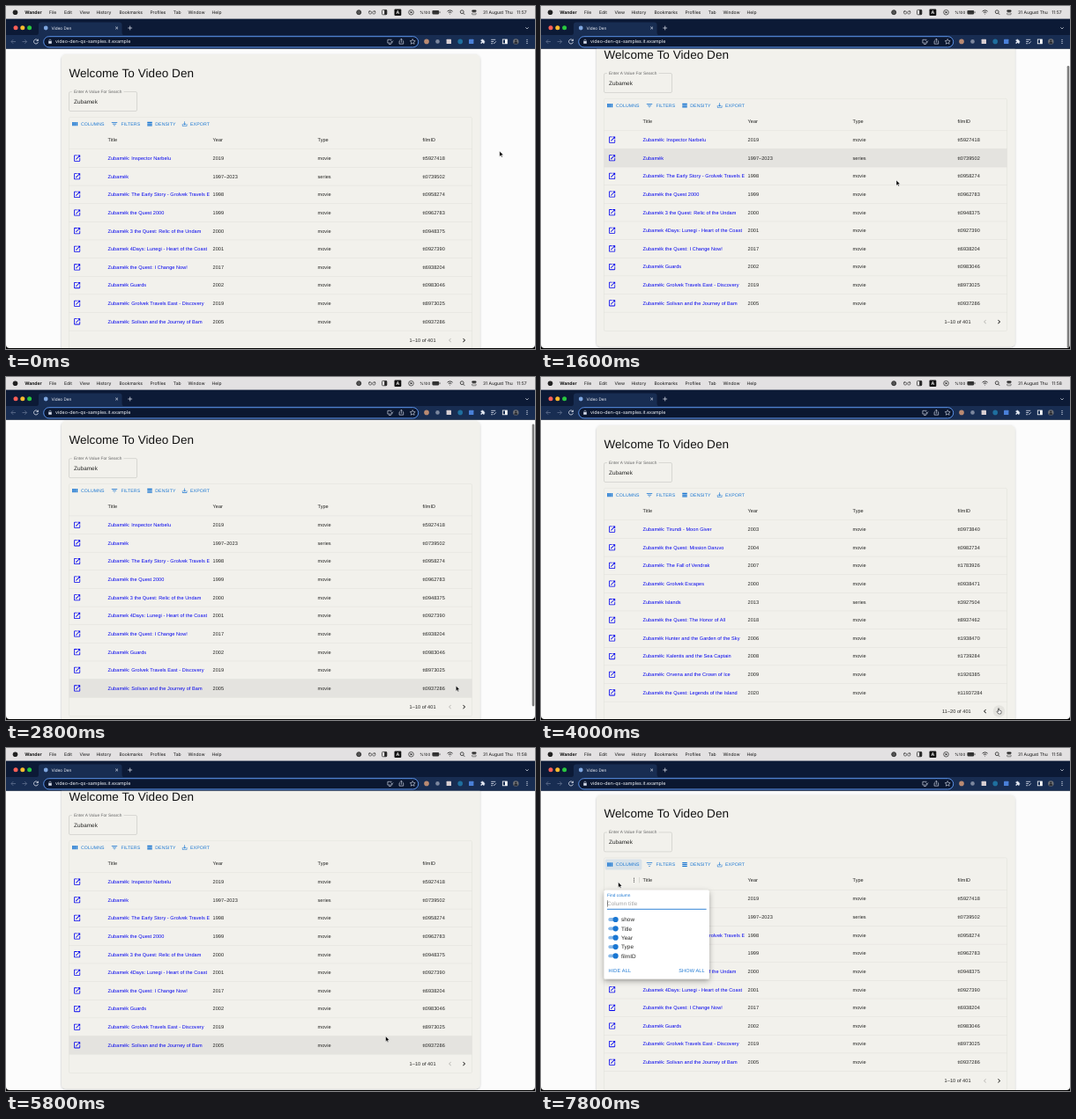
Animation, 600 px wide and 390 px high, one loop 8 s. Source, as an HTML page:

```html
<!DOCTYPE html>
<html lang="en">
<head>
<meta charset="utf-8">
<title>Video Den</title>
<style>
  html, body { margin: 0; width: 100%; height: 100%; overflow: hidden; background: #000; }
  svg { display: block; width: 100vw; height: 100vh; text-rendering: geometricPrecision; }
  text { font-family: "Liberation Sans", Arial, sans-serif; letter-spacing: .0107em; white-space: pre; }
  .ui { font-family: Inter, sans-serif; letter-spacing: 0; }
</style>
</head>
<body>
<svg id="stage" viewBox="0 0 600 390">
  <defs>
    <clipPath id="view"><path d="M0 48.5H600V385a4 4 0 0 1-4 4H4a4 4 0 0 1-4-4z"/></clipPath>
    <clipPath id="titleCol"><rect x="111" y="140" width="119.7" height="240"/></clipPath>
    <filter id="soft" x="-10%" y="-10%" width="120%" height="125%">
      <feDropShadow dx="0" dy=".8" stdDeviation="1" flood-opacity=".28"/>
    </filter>
    <filter id="deep" x="-20%" y="-20%" width="140%" height="150%">
      <feDropShadow dx="0" dy="2.5" stdDeviation="3" flood-opacity=".34"/>
    </filter>
  </defs>
</svg>
<script>
const LOOP = 8000, STEP = 200;
const ROW_TOP = 162.8, ROW_H = 20.635, MAX_SCROLL = 21;
const BLUE = '#1976d2', LINK = '#0000ee', INK = '#222220', LINE = '#dfded9';
const stage = document.getElementById('stage');

function add(parent, tag, attrs = {}, content) {
  const node = document.createElementNS(stage.namespaceURI, tag);
  for (const key in attrs) node.setAttribute(key, attrs[key]);
  if (content !== undefined) node.textContent = content;
  return parent.appendChild(node);
}
const group = (parent, attrs) => add(parent, 'g', attrs);
const rect = (parent, x, y, width, height, fill, more) =>
  add(parent, 'rect', { x, y, width, height, fill, ...more });
const circle = (parent, cx, cy, r, fill, more) => add(parent, 'circle', { cx, cy, r, fill, ...more });
const stroke = (parent, d, color, width = .8, more) =>
  add(parent, 'path', { d, fill: 'none', stroke: color, 'stroke-width': width, ...more });
const label = (parent, x, y, size, fill, content, more) =>
  add(parent, 'text', { x, y, 'font-size': size, fill, ...more }, content);
// Icon drawn on a 24-unit grid, centred on x, y
const icon = (parent, d, x, y, size, fill) => add(parent, 'path', {
  d, fill, transform: `translate(${x - size / 2} ${y - size / 2}) scale(${size / 24})`
});

const ICONS = {
  open: 'M19 19H5V5h7V3H5c-1.1 0-2 .9-2 2v14c0 1.1.9 2 2 2h14c1.1 0 2-.9 2-2v-7h-2zM14 3v2h3.6l-9.8 9.8 1.4 1.4L19 6.4V10h2V3z',
  columns: 'M2 5h5.4v14H2zM9.3 5h5.4v14H9.3zM16.6 5H22v14h-5.4z',
  filters: 'M10 18h4v-2h-4zM3 6v2h18V6zm3 7h12v-2H6z',
  density: 'M21 8H3V4h18zM21 10H3v4h18zM21 16H3v4h18z',
  download: 'M19 12v7H5v-7H3v7c0 1.1.9 2 2 2h14c1.1 0 2-.9 2-2v-7zm-6 .7 2.6-2.6L17 11.5l-5 5-5-5 1.4-1.4 2.6 2.6V3h2z',
  left: 'M15.4 7.4 14 6l-6 6 6 6 1.4-1.4-4.6-4.6z',
  right: 'M10 6 8.6 7.4l4.6 4.6-4.6 4.6L10 18l6-6z',
  puzzle: 'M20 11h-1V7a2 2 0 0 0-2-2h-4V3.500a2.500 2.500 0 0 0-5 0V5H4v5h1.500a2.700 2.700 0 0 1 0 5.400H4V21h5v-1.500a2.700 2.700 0 0 1 5.400 0V21H19v-5h1a2.500 2.500 0 0 0 0-5z'
};

const NAME = 'Zubamék';
const PAGES = [
  { range: '1–10 of 401', x: 457.6, rows: [
    [': Inspector Narbelu', '2019', 'tt5927418'],
    ['', '1997–2023', 'tt0739502', 'series'],
    [': The Early Story - Grolvek Travels East', '1998', 'tt0958274'],
    [' the Quest 2000', '1999', 'tt0962783'],
    [' 3 the Quest: Relic of the Undam', '2000', 'tt0948375'],
    [' 4Days: Lunegi - Heart of the Coast', '2001', 'tt0927390'],
    [' the Quest: I Change Now!', '2017', 'tt6938204'],
    [' Guards', '2002', 'tt0983046'],
    [': Grolvek Travels East - Discovery', '2019', 'tt8973025'],
    [': Solivan and the Journey of Bam', '2005', 'tt0937286']
  ] },
  { range: '11–20 of 401', x: 455, rows: [
    [': Tirundi - Moon Giver', '2003', 'tt0973840'],
    [' the Quest: Mission Daruvo', '2004', 'tt0982734'],
    [': The Fall of Vendrak', '2007', 'tt1783926'],
    [': Grolvek Escapes', '2000', 'tt0938471'],
    [' Islands', '2013', 'tt3927504', 'series'],
    [' the Quest: The Honor of All', '2018', 'tt8937462'],
    [' Hunter and the Garden of the Sky', '2006', 'tt1938470'],
    [': Kalentis and the Sea Captain', '2008', 'tt1739284'],
    [': Orvena and the Crown of Ice', '2009', 'tt1926385'],
    [' the Quest: Legends of the Island', '2020', 'tt11937284']
  ] }
];

// Page
const view = group(stage, { 'clip-path': 'url(#view)' });
rect(view, 0, 48, 600, 342, '#fcfcfc');
const page = group(view);
rect(page, 63, 55, 474.5, 353.5, '#f2f1ec', { rx: 5, filter: 'url(#soft)' });
label(page, 71.4, 80.8, 13.5, '#111', 'Welcome To Video Den', { style: 'letter-spacing:.005em' });
stroke(page, 'M75 97.600H73a1.500 1.500 0 0 0-1.500 1.500V118a1.500 1.500 0 0 0 1.500 1.500H147a1.500 1.500 0 0 0 1.500-1.500V99a1.500 1.500 0 0 0-1.500-1.500H133.500', '#bdbcb8', .5);
label(page, 77, 99.1, 4.76, '#666', 'Enter A Value For Search');
label(page, 77, 110.8, 6.35, INK, 'Zubamek');

const hoverRow = rect(page, 71.5, ROW_TOP, 457, ROW_H, '#e4e3df');
rect(page, 71.5, 126.4, 457, 264.2, 'none', { rx: 1.6, stroke: LINE, 'stroke-width': .5 });
const columnsHover = rect(page, 72.800, 128, 41.500, 12.200, BLUE, { rx: 1.6, opacity: .12 });
[['columns', 78.2, 84.9, 'COLUMNS'], ['filters', 123, 130.4, 'FILTERS'],
 ['density', 163, 169.2, 'DENSITY'], ['download', 202.6, 209, 'EXPORT']].forEach(([name, ix, tx, word]) => {
  icon(page, ICONS[name], ix, 134.1, name === 'filters' ? 8.6 : 7.3, BLUE);
  label(page, tx, 136, 5.16, BLUE, word, { style: 'letter-spacing:.0286em' });
});
[[115.5, 'Title'], [234.5, 'Year'], [353.5, 'Type'], [472.6, 'filmID']]
  .forEach(([x, word]) => label(page, x, 153.7, 5.56, INK, word));
for (let i = 0; i <= 10; i++) rect(page, 71.5, ROW_TOP - .25 + i * ROW_H, 457, .5, LINE);

const pageGroups = PAGES.map(({ range, x, rows }, n) => {
  const g = group(page);
  const titles = group(g, { 'clip-path': 'url(#titleCol)' });
  rows.forEach(([title, year, id, type = 'movie'], i) => {
    const mid = ROW_TOP + (i + .5) * ROW_H, base = mid + 1.85;
    const brand = title.startsWith(' 4') ? 'Zubamek' : NAME;
    icon(g, ICONS.open, 80.6, mid, 9.5, LINK);
    label(titles, 115.5, base, 5.56, LINK, brand + title);
    label(g, 234.5, base, 5.56, INK, year);
    label(g, 353.5, base, 5.56, INK, type);
    label(g, 472.6, base, 5.56, INK, id);
  });
  label(g, x, 382, 5.56, INK, range);
  icon(g, ICONS.left, 503.6, 380, 9.5, n ? INK : '#bcbbb7');
  icon(g, ICONS.right, 519.5, 380, 9.5, INK);
  return g;
});
const nextHover = circle(page, 519.5, 380, 6.8, '#000', { opacity: .06 });
const thumb = rect(view, 596.7, 49, 2.6, 321, '#7d7d7d', { rx: 1.3 });

// Column chooser
const menu = group(view);
circle(menu, 105.5, 148.2, .6, '#555');
circle(menu, 105.5, 150.2, .6, '#555');
circle(menu, 105.5, 152.2, .6, '#555');
rect(menu, 111, 147, .7, 6.4, '#cfcec9');
rect(menu, 71.5, 161.6, 119.3, 101, '#fff', { rx: 1.6, filter: 'url(#deep)' });
label(menu, 75, 169.2, 4.76, BLUE, 'Find column');
label(menu, 75, 179.2, 6.35, '#a2a2a2', 'Column title');
rect(menu, 75, 173.2, .5, 7.4, '#222');
rect(menu, 75, 182.8, 112.600, .9, BLUE);
['show', 'Title', 'Year', 'Type', 'filmID'].forEach((word, i) => {
  const y = 195 + i * 10.35;
  rect(menu, 76.300, y - 1.900, 10.200, 3.8, '#8cbae8', { rx: 1.9 });
  circle(menu, 84.600, y, 3.1, BLUE);
  label(menu, 91, y + 2.2, 6.35, INK, word);
});
label(menu, 76.5, 255.4, 5.56, BLUE, 'HIDE ALL', { style: 'letter-spacing:.0286em' });
label(menu, 156.200, 255.4, 5.56, BLUE, 'SHOW ALL', { style: 'letter-spacing:.0286em' });

// System menu bar
rect(stage, 0, 0, 600, 15, '#e3e1e2');
circle(stage, 10.500, 7.2, 2.8, '#222');
const ui = (x, y, size, fill, word, more) => label(stage, x, y, size, fill, word, { class: 'ui', ...more });
ui(21.2, 9.1, 5.1, '#111', 'Wander', { 'font-weight': 700 });
[[49, 'File'], [66, 'Edit'], [83.4, 'View'], [102.4, 'History'], [128.4, 'Bookmarks'], [163.4, 'Profiles'],
 [189.8, 'Tab'], [206.4, 'Window'], [233.6, 'Help']].forEach(([x, word]) => ui(x, 9.1, 5, '#111', word));
circle(stage, 400.2, 7.2, 2.5, '#555', { stroke: '#222', 'stroke-width': .8 });
stroke(stage, 'M411.500 7.500a1.600 1.600 0 1 0 3.200 0a1.600 1.600 0 1 0-3.200 0M415.700 7.500a1.600 1.600 0 1 0 3.200 0a1.600 1.600 0 1 0-3.200 0M411.500 7l1-2M418.900 7l-1-2', '#222', .6);
rect(stage, 426.5, 4.4, 5.4, 5.4, 'none', { rx: 1, stroke: '#222', 'stroke-width': .7 });
rect(stage, 429.2, 4.4, 2.7, 5.4, '#222');
rect(stage, 440.5, 3.5, 7.8, 7.4, '#111', { rx: 1 });
ui(442.6, 9.1, 5.2, '#fff', 'A', { 'font-weight': 600 });
circle(stage, 459.5, 7.2, 2.800, 'none', { stroke: '#222', 'stroke-width': .7 });
add(stage, 'path', { d: 'M458.700 5.800l2.300 1.400-2.300 1.400z', fill: '#222' });
ui(469.3, 9, 4.5, '#111', '%100');
rect(stage, 483.4, 5, 7.8, 4.4, '#333', { rx: 1.1 });
rect(stage, 491.7, 6.3, .7, 1.8, '#333');
stroke(stage, 'M500.600 6.200a4.200 4.200 0 0 1 6 0M501.900 7.700a2.400 2.400 0 0 1 3.400 0M503.300 9.200h.6', '#222', .9);
stroke(stage, 'M515.300 6.700a1.900 1.900 0 1 0 3.800 0a1.900 1.900 0 1 0-3.800 0M518.600 8.100l1.600 1.700', '#222');
rect(stage, 528.3, 4.5, 5.2, 2.3, '#222', { rx: 1.1 });
rect(stage, 528.5, 7.800, 4.800, 2, 'none', { rx: 1, stroke: '#222', 'stroke-width': .5 });
ui(541, 9.1, 5, '#111', '31 August Thu');
const clock = ui(579.300, 9.1, 5, '#111', '11:57');

// Browser frame
rect(stage, 0, 14.6, 600, 19, '#0c1a36');
rect(stage, 0, 33, 600, 15.6, '#182d52');
['#ff5f57', '#febc2e', '#28c840'].forEach((color, i) => circle(stage, 11 + i * 7.8, 24.8, 2.5, color));
add(stage, 'path', { d: 'M34 33.200q3 0 3-3V21.500q0-3 3-3H128.500q3 0 3 3V30.200q0 3 3 3z', fill: '#182d52' });
circle(stage, 45.2, 25, 2.4, '#7ea6e0');
ui(51.4, 26.9, 4.7, '#f0f3fa', 'Video Den');
stroke(stage, 'M124.200 23.600l2.800 2.800M127 23.600l-2.800 2.800M138.300 25h4.800M140.700 22.600v4.800M589.300 24.300l1.700 1.700 1.700-1.700', '#e3e8f3', .7);
const arrow = 'M11 40.500H6M8.200 38.200L5.900 40.500l2.300 2.300';
stroke(stage, arrow, '#60708f');
stroke(stage, arrow, '#60708f', .8, { transform: 'translate(29.500 0) scale(-1 1)' });
stroke(stage, 'M36.200 39.200a2.500 2.500 0 1 0 .2 2M36.400 37.700v1.900h-1.900', '#e6ebf5');
rect(stage, 42.7, 34.7, 425, 12.2, '#0b1730', { rx: 6.1, stroke: '#5b93ea', 'stroke-width': 1 });
rect(stage, 48.2, 39.9, 3.6, 2.9, '#d5dceb', { rx: .4 });
stroke(stage, 'M48.900 40v-.8a1.100 1.100 0 0 1 2.200 0v.8', '#d5dceb', .6);
ui(56, 42.4, 5.35, '#f3f6fb', 'video-den-qx-samples.it.example');
stroke(stage, 'M437.500 38.300h-4.600v3.800h5v-1.500M434.200 43.500h2.500M436.500 39.500l1.300 1.400 1.300-1.400M446.900 39.800h-.8v3.300h4.600v-3.300h-.8M448.400 41.700V37.300M447 38.600l1.400-1.400 1.400 1.400', '#d5dceb', .65);
stroke(stage, 'M461.200 37.500l.9 2 2.100.2-1.600 1.400.5 2.100-1.900-1.100-1.900 1.100.5-2.100-1.600-1.400 2.100-.2z', '#d5dceb', .6);
circle(stage, 477, 40.4, 2.8, '#b98a72');
circle(stage, 489.5, 40.4, 2.3, '#7c879e');
rect(stage, 499.6, 37.7, 5.4, 5.4, '#d8cfd2', { rx: .5 });
circle(stage, 515.2, 40.4, 2.8, '#1f6f9e');
rect(stage, 525, 37.7, 5.4, 5.4, '#4a80d8', { rx: .6 });
icon(stage, ICONS.puzzle, 540.6, 40.4, 6.4, '#e6ebf5');
stroke(stage, 'M550.200 38.300h5M550.200 40.500h3M550.200 42.700h2M553.200 43l2.600-2.700', '#e6ebf5', .8);
rect(stage, 563.3, 38, 5, 4.8, 'none', { stroke: '#fff', 'stroke-width': .8 });
rect(stage, 566, 38, 2.3, 4.8, '#fff');
circle(stage, 578.3, 40.4, 3.2, '#6d7076');
circle(stage, 578.3, 39.600, 1.1, '#23262c');
add(stage, 'path', { d: 'M576.200 42.800a2.100 2.100 0 0 1 4.200 0z', fill: '#23262c' });
[38.4, 40.4, 42.4].forEach(y => circle(stage, 591, y, .55, '#e6ebf5'));

// Pointers, each with its hot spot at 0, 0
const pointers = {
  arrow: add(stage, 'path', { d: 'M0 0V6.200L1.400 4.900 2.400 7.100 3.400 6.600 2.400 4.500H4.400z', fill: '#000', stroke: '#fff', 'stroke-width': .5 }),
  hand: add(stage, 'path', { d: 'M-.9-3Q-.3-3.600 .2-2.800V-.8L2.200-.3Q2.900 0 2.700 1L2.100 3.200H-.7L-2.500 .8Q-2.500 0-1.700 .2L-.9 .8z', fill: '#fff', stroke: '#111', 'stroke-width': .55 }),
  beam: stroke(stage, 'M-1.300-3.200Q0-3.200 0-2.200V2.200Q0 3.200-1.300 3.200M1.300-3.200Q0-3.200 0-2.200M0 2.200Q0 3.200 1.300 3.200M-.8 .8H.8', '#222', .6)
};

// Keys: time, then values
const MOVES = [[400, 559.8, 165], [1200, 403, 198], [1700, 403, 198], [2600, 508, 345], [2800, 510.3, 351], [3200, 519.5, 379.8],
  [4200, 519.5, 379.8], [5000, 509, 367.5], [5400, 503.6, 359.500], [5600, 503.6, 359.500], [6000, 357.5, 296],
  [6500, 357.5, 296], [7200, 94, 133], [7500, 94, 133], [7800, 87.6, 152.5]];
const SCROLLS = [[1200, 0], [1600, MAX_SCROLL], [1800, MAX_SCROLL], [2400, 6], [2800, 4.9], [3000, 0],
  [4400, 0], [5000, 20.5], [5200, MAX_SCROLL], [6000, MAX_SCROLL], [6400, 1.6]];

function sample(keys, t) {
  const i = keys.findIndex(key => key[0] > t);
  if (i === 0) return keys[0].slice(1);
  if (i < 0) return keys[keys.length - 1].slice(1);
  const [a, b] = [keys[i - 1], keys[i]];
  const u = (t - a[0]) / (b[0] - a[0]), k = u * u * (3 - 2 * u);
  return a.slice(1).map((v, j) => v + (b[j + 1] - v) * k);
}
const scrollAt = t => sample(SCROLLS, t)[0];
const show = (node, on) => node.setAttribute('display', on ? 'inline' : 'none');
const between = (t, from, to) => t >= from && t < to;

function render(t) {
  const [x, y] = sample(MOVES, t), scroll = scrollAt(t);
  const menuOpen = t >= 7600, second = between(t, 3600, 5600);
  page.setAttribute('transform', `translate(0 ${-scroll})`);
  show(pageGroups[0], !second);
  show(pageGroups[1], second);
  show(menu, menuOpen);
  show(columnsHover, t >= 7200);

  const onNext = between(t, 3200, 4400), onPrev = between(t, 5400, 5800);
  show(nextHover, onNext);
  // Hover lags behind scrolling
  const row = Math.floor((y + scrollAt(t - 400) - ROW_TOP) / ROW_H);
  show(hoverRow, !menuOpen && x > 71 && x < 529 && row >= 0 && row < 10);
  hoverRow.setAttribute('y', ROW_TOP + row * ROW_H);

  show(thumb, scroll !== scrollAt(t - 600));
  thumb.setAttribute('y', 49 + scroll * .9);
  clock.textContent = t < 3400 ? '11:57' : '11:58';

  const kind = onNext || onPrev || between(t, 7200, 7600) ? 'hand' : between(t, 6000, 6600) ? 'beam' : 'arrow';
  for (const name in pointers) {
    show(pointers[name], name === kind);
    pointers[name].setAttribute('transform', `translate(${x} ${y})`);
  }
}

function tick(now) {
  render(Math.floor(now % LOOP / STEP) * STEP);
  requestAnimationFrame(tick);
}
requestAnimationFrame(tick);
</script>
</body>
</html>
```
